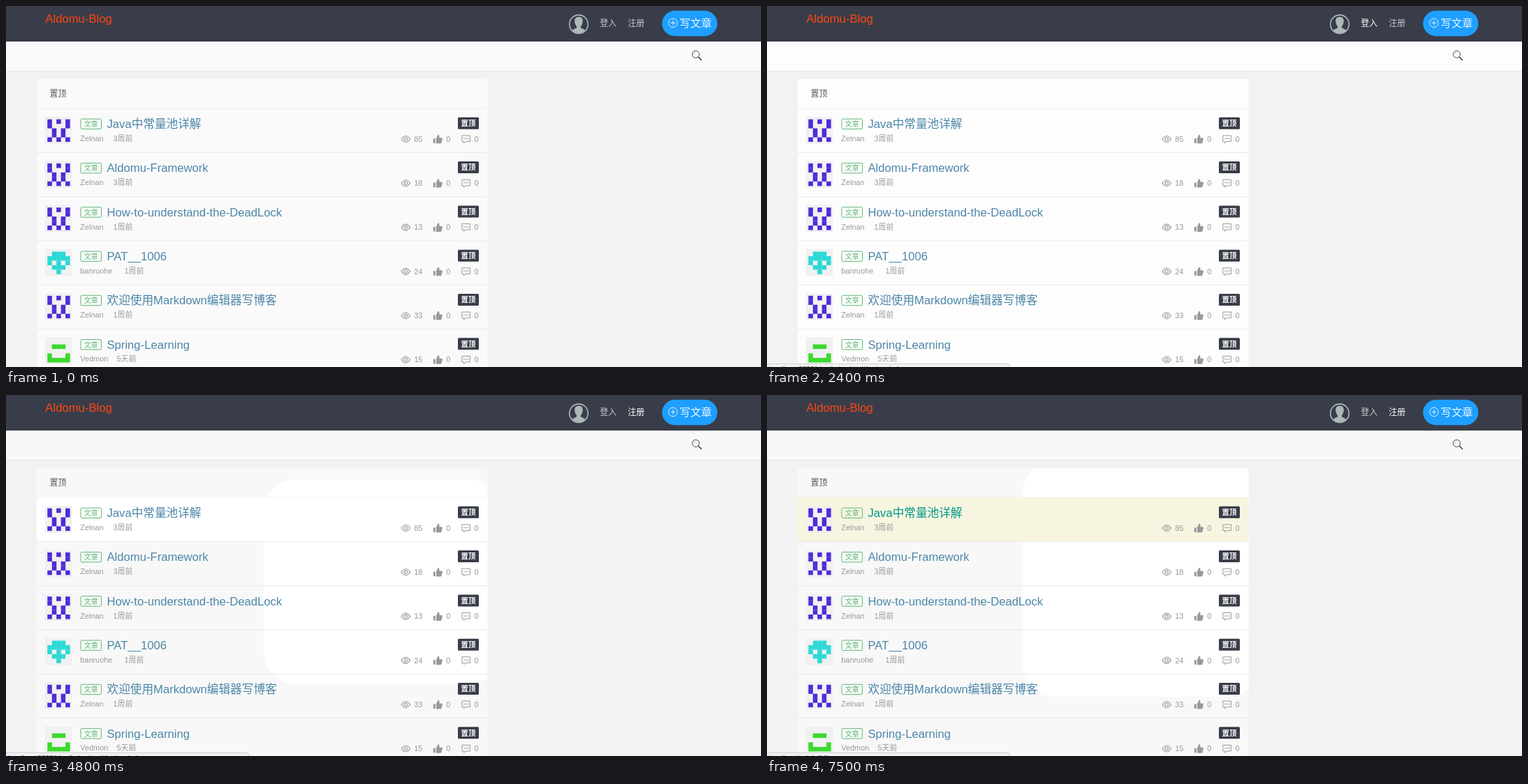
Recreate the animation shown at these times as an HTML page. Size 1081 by 518 pixels, loop 8 s.

```html
<!DOCTYPE html>
<html lang="zh-CN">
<head>
<meta charset="utf-8">
<title>Aldomu-Blog</title>
<style>
html, body { margin: 0; width: 100%; height: 100%; overflow: hidden; background: #f2f2f2; }
svg { display: block; width: 100%; height: 100%; --paper: #fafafa; }
text { font-family: "Liberation Sans", "Noto Sans CJK SC", "Noto Sans CJK", sans-serif; white-space: pre; }
.paper { fill: var(--paper); }
.dialog { filter: drop-shadow(0 0 7px rgba(0, 0, 0, .2)); }
</style>
</head>
<body>
<svg id="stage" viewBox="0 0 1081 518" xmlns="http://www.w3.org/2000/svg"></svg>
<script>
const LOOP = 8000, TICK = 100, ROW = 63.3;
const stage = document.getElementById('stage');

const rect = (x, y, w, h, fill, more = '') =>
  `<rect x="${x}" y="${y}" width="${w}" height="${h}" fill="${fill}" ${more}/>`;
const text = (x, y, size, label, fill, more = '') =>
  `<text x="${x}" y="${y}" font-size="${size}" fill="${fill}" ${more}>${label}</text>`;
const path = (d, color, width = 1, more = '') =>
  `<path d="${d}" fill="none" stroke="${color}" stroke-width="${width}" ${more}/>`;
const middle = 'text-anchor="middle"', bold = 'font-weight="700"';

const faces = {
  violet: ['#4f2bd8', 'X.X.X', 'X...X', '.X.X.', '.X.X.', 'X.X.X'],
  cyan: ['#2bd9d6', '.XXX.', 'XXXXX', 'X.X.X', '.XXX.', '..X..'],
  green: ['#39d92b', '.....', '.XXX.', '.....', 'X...X', 'XXXXX']
};
const posts = [
  ['Java中常量池详解', 'Zelnan', 154, '3周前', 85, 'violet'],
  ['Aldomu-Framework', 'Zelnan', 154, '3周前', 18, 'violet'],
  ['How-to-understand-the-DeadLock', 'Zelnan', 154, '1周前', 13, 'violet'],
  ['PAT__1006', 'banruohe', 170, '1周前', 24, 'cyan'],
  ['欢迎使用Markdown编辑器写博客', 'Zelnan', 154, '1周前', 33, 'violet'],
  ['Spring-Learning', 'Vedmon', 159, '5天前', 15, 'green']
];

function face(kind) {
  const [color, ...lines] = faces[kind];
  const cell = 6.45;
  const cells = lines.flatMap((line, r) => [...line].map((c, i) =>
    c === 'X' ? rect(59.3 + i * cell, 15.3 + r * cell, cell + .1, cell + .1, color) : ''));
  return rect(56.5, 12.5, 37, 37, '#f1f1f1', 'stroke="#ececec"') + cells.join('');
}

function post([title, author, dateX, date, views, kind], i) {
  const gray = '#999';
  return `<g transform="translate(0 ${147.3 + i * ROW})">
    ${i ? '' : rect(44, 0, 645.5, ROW, '#f7f5e0', 'id="hover"')}
    ${path('M44 63.2H689.5', '#e9e9ec')}
    ${face(kind)}
    ${rect(107, 14.8, 29.5, 14.4, 'none', 'rx="1.5" stroke="#5fb878"')}
    ${text(121.8, 25.8, 10, '文章', '#5fb878', middle)}
    ${text(144.5, 27.8, 16.65, title, '#4c86a8', i ? '' : 'id="firstTitle"')}
    ${text(106.3, 46.7, 10.9, author, gray)}
    ${text(dateX - .5, 46.7, 10.9, date, gray)}
    ${rect(647, 12.5, 30, 17, '#393d49', 'rx="1.5"')}
    ${text(662, 24.8, 10.4, '置顶', '#fff', `${middle} ${bold}`)}
    ${path('M566 43.7Q572.3 34.7 578.6 43.7Q572.3 52.7 566 43.7Z', gray, 1.1)}
    <circle cx="572.3" cy="43.7" r="2.2" fill="none" stroke="${gray}" stroke-width="1.1"/>
    ${text(584.3, 47.6, 10.9, views, gray)}
    ${rect(611.8, 43, 3, 6.5, gray)}
    <path d="M616 42.5L618.6 37.3Q620.8 37 620.5 42H624Q625.3 42.3 624.8 44L623.5 49Q623 50 621.5 50H616Z" fill="${gray}"/>
    ${text(630.3, 47.6, 10.9, 0, gray)}
    ${path('M652.8 38.6H664.4V47.2H658L655.6 49.5V47.2H652.8Z', gray)}
    ${path('M655.3 43H662.2', gray, 1.5, 'stroke-dasharray="1.5 1.2"')}
    ${text(670.4, 47.6, 10.9, 0, gray)}
  </g>`;
}

const page = `<g id="page">
  <rect class="paper" y="40" width="1081" height="53.5"/>
  ${path('M0 93.8H1081', '#e4e4e6')}
  <circle cx="987.5" cy="69.3" r="5.1" fill="none" stroke="#333" stroke-width=".9"/>
  ${path('M984.5 69Q985 66.5 987.5 66.3', '#999', .7)}
  ${path('M991.3 73.2L996 77.8', '#333', 1.5)}
  <clipPath id="cardClip"><rect x="44" y="105" width="645.5" height="422"/></clipPath>
  <rect class="paper" x="44" y="105" width="645.5" height="422"/>
  <g clip-path="url(#cardClip)"><rect id="glow" fill="#fff" rx="45"/></g>
  ${text(62.5, 130, 12, '置顶', '#555')}
  ${path('M44 147.2H689.5', '#eeeeef')}
  ${posts.map(post).join('')}
  ${path('M0 580.5H1081', '#dfe7f0')}
</g>`;

const header = `${rect(0, 0, 1081, 51, '#393d49')}
  ${text(56.3, 24, 16.7, 'Aldomu-Blog', '#ff4512')}
  <circle cx="820" cy="26.2" r="13.3" fill="#393d49" stroke="#adb8b8" stroke-width="1.6"/>
  <path d="M820 15.5C825.5 15.5 826.5 20 825.4 24.5Q824.5 28 823 29.3V31.6Q828 33 829 35.3A13 13 0 0 1 811 35.3Q812 33 817 31.6V29.3Q815.5 28 814.6 24.5C813.5 20 814.5 15.5 820 15.5Z" fill="#adb8b8"/>
  ${text(850.3, 29.3, 12, '登入', '#c8cacf', 'id="login"')}
  ${text(890.3, 29.3, 12, '注册', '#c8cacf', 'id="register"')}
  ${rect(939.3, 6.8, 79.2, 36.4, '#1e9fff', 'rx="18.2"')}
  <circle cx="955" cy="24.3" r="6.3" fill="none" stroke="#e4f3ff"/>
  ${path('M951.5 24.3H958.5M955 20.8V27.8', '#e4f3ff')}
  ${text(964.6, 30, 15.3, '写文章', '#f0f8ff')}`;

const status = `<g id="status">
  <path d="M-1 513.5H344Q347.5 513.5 347.5 517V520H-1Z" fill="#f2f2f2" stroke="#cfcfcf"/>
  ${text(3, 524.8, 10, '', '#444', 'id="statusText"')}
</g>`;

const frame = (w, h, title) => `${rect(0, 0, w, h, '#fff', 'rx="1.5"')}
  ${rect(0, 0, w, 35, '#009f95')}
  ${text(16, 22.2, 11.8, title, '#fff', bold)}
  ${path(`M${w - 24.5} 14.5l9 9m0 -9l-9 9`, '#2e2d3c', 1.3)}`;
const field = (x, y, w, fill = '#fff') =>
  rect(x + .5, y + .5, w - 1, 31, fill, 'stroke="#e6e6e6"');
const button = (x, y, w, label) =>
  rect(x, y, w, 32, '#009688', 'rx="1.5"') +
  text(x + w / 2, y + 20.2, 11.8, label, '#fff', `${middle} ${bold}`);

// Deterministic specks for the code field
const specks = Array.from({ length: 36 }, (_, i) =>
  rect(146 + i * 37 % 95, 133.5 + i * 17 % 30, 1, 1, ['#4b7', '#a5c', '#58d', '#865'][i % 4])).join('');
const glyph = (x, y, size, c, fill) => text(x, y, size, c, fill, bold);
const loginBox = `${frame(250, 220.5, '登录窗口')}
  ${field(8.5, 43.5, 233, '#faffbd')}${text(17, 63.5, 11.8, 'qev7', '#111')}
  ${field(8.5, 87.5, 233, '#faffbd')}${text(17, 108, 11.8, '••••', '#111')}
  ${field(8.5, 132, 233)}${text(17, 152.2, 11.8, '验证码', '#777')}
  ${rect(145, 132.5, 96.5, 31, '#d3e2da')}${specks}
  ${path('M146 140L208 163', '#e0408a')}
  ${path('M152 134L241 150', '#5b8be0', .8)}
  ${path('M165 163L238 136', '#a85ad0', .8)}
  ${glyph(148, 154.5, 25, 'O', '#2a1518')}${glyph(167, 155.5, 23, 'w', '#1d50d8')}
  ${glyph(186, 155.5, 23, 'x', '#4d63e6')}${glyph(205, 155, 25, '4', '#3b1c63')}
  ${glyph(226, 156, 25, '7', '#80501c')}
  ${button(99, 176, 142, '登陆系统')}`;

const entries = [['登录名', '登录名'], ['邮箱', '邮箱(用于账号激活)'], ['密码', '密码'], ['确认密码', '确认密码']];
const registerBox = frame(261, 265, '新用户注册') +
  entries.map(([label, hint], i) => {
    const y = 43.5 + i * 44;
    return field(9, y, 243) + path(`M100 ${y}v32`, '#e6e6e6') +
      text(54.5, y + 20.2, 11.8, label, '#222', middle) + text(108, y + 20.2, 11.8, hint, '#777');
  }).join('') + button(100, 220, 53.5, '注册');

const dialog = (id, w, h, body) =>
  `<g id="${id}" class="dialog"><g transform="translate(${-w / 2} ${-h / 2})">${body}</g></g>`;

stage.innerHTML = page + header + rect(0, 0, 1081, 518, '#000', 'id="shade" opacity=".6"') +
  dialog('loginBox', 250, 220.5, loginBox) + dialog('registerBox', 261, 265, registerBox) + status;

const el = id => document.getElementById(id);
const show = (id, on) => { el(id).style.display = on ? '' : 'none'; };
const within = (t, ...spans) => spans.some(([a, b]) => t >= a && t < b);
const latest = (t, steps) => steps.filter(([at]) => at <= t).pop()[1];

const scrollSteps = [[0, 0], [1000, 14], [1100, 78], [1200, 92], [1600, 74], [1700, 14], [1800, 2], [1900, 0]];
const paperSteps = [[0, '#fafafa'], [1000, '#fdfdfd'], [3800, '#f8f8f8']];
const glowSteps = [[0, null], [4100, [369, 121, 340, 293]], [4900, null], [5900, [366, 95, 340, 338]]];
const dialogs = [['loginBox', 2850, 3875], ['registerBox', 4880, 5775]];
const IN = 300, OUT = 200;

// Zoom in on opening; swell a little, then shrink away on closing
function pose(t, open, close) {
  if (t < close) {
    const p = Math.min(1, (t - open) / IN), e = 1 - (1 - p) ** 2;
    return [.5 + .5 * e, e];
  }
  const p = (t - close) / OUT;
  return [p < .3 ? 1 + p / .3 * .05 : 1.05 - (p - .3) / .7 * .35, 1 - p ** 1.3];
}

function draw(now) {
  const t = Math.floor(now % LOOP / TICK) * TICK;
  el('page').setAttribute('transform', `translate(0 ${-latest(t, scrollSteps)})`);
  stage.style.setProperty('--paper', latest(t, paperSteps));

  const glow = latest(t, glowSteps);
  show('glow', glow);
  if (glow) ['x', 'y', 'width', 'height'].forEach((k, i) => el('glow').setAttribute(k, glow[i]));

  const rowLit = within(t, [600, 2200], [4100, 4400], [5900, LOOP]);
  const rowWhite = within(t, [4400, 4900]);
  show('hover', rowLit || rowWhite);
  el('hover').setAttribute('fill', rowWhite ? '#fff' : '#f7f5e0');
  el('firstTitle').setAttribute('fill', t >= 6300 ? '#009688' : '#4c86a8');
  el('login').setAttribute('fill', within(t, [2300, 4400]) ? '#fff' : '#c8cacf');
  el('register').setAttribute('fill', t >= 4400 ? '#fff' : '#c8cacf');

  show('status', within(t, [2400, 2800], [4500, 5300], [6400, LOOP]));
  el('status').setAttribute('opacity', within(t, [4500, 4600], [6400, 6500]) ? .5 : 1);
  el('statusText').textContent = t >= 7500 ? 'localhost/article/1/1'
    : t >= 6400 ? 'localhost/article/1' : 'localhost:8080/blog/index.html#login-window';

  show('shade', dialogs.some(([, open, close]) => t >= open && t < close));
  for (const [id, open, close] of dialogs) {
    const on = t >= open && t < close + OUT;
    show(id, on);
    if (!on) continue;
    const [scale, opacity] = pose(t, open, close);
    el(id).setAttribute('transform', `translate(531 265.5) scale(${scale})`);
    el(id).setAttribute('opacity', opacity);
  }
}

const start = performance.now();
function tick() {
  draw(performance.now() - start);
  requestAnimationFrame(tick);
}
tick();
</script>
</body>
</html>
```
